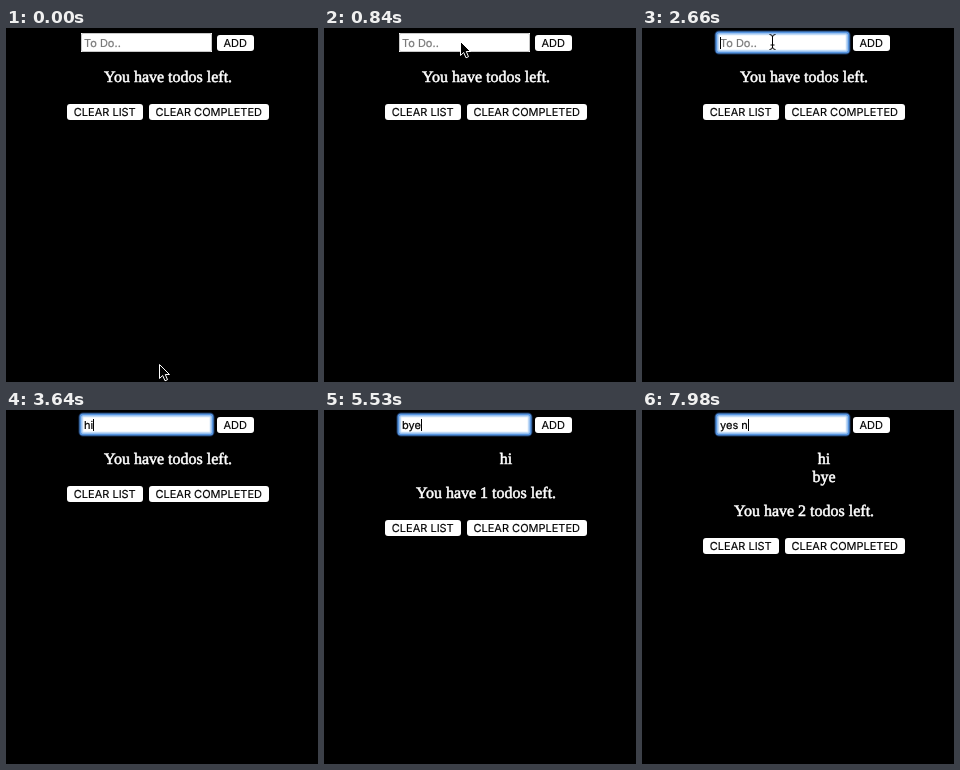
Recreate the animation shown at these times as an HTML page with a canvas. Size 312 by 354 pixels, loop 8000 ms.

```html
<!DOCTYPE html>
<html lang="en">
<head>
<meta charset="utf-8">
<title>To-do list</title>
<style>
html, body { margin: 0; width: 100%; height: 100%; overflow: hidden; background: #000; }
canvas { display: block; }
</style>
</head>
<body>
<canvas id="stage" width="312" height="354"></canvas>
<script>
const ctx = document.getElementById('stage').getContext('2d');
const LOOP = 8000;
const STEP = 70;
const UI = '11px Inter, sans-serif';
const SERIF = '16px "Liberation Serif", serif';
const FIELD = { x: 75, y: 5, w: 131, h: 19 };

const BEAM_AT = 2170;
const FOCUS_AT = 2660;
const keys = [
  ['h', 3500], ['i', 3640], ['\n', 4130],
  ['b', 5040], ['y', 5180], ['e', 5530], ['\n', 6090],
  ['y', 7140], ['e', 7280], ['s', 7560], [' ', 7630], ['n', 7980]
];

// Progress from 0 to 1 between two times
function ramp(t, from, to) {
  return Math.min(1, Math.max(0, (t - from) / (to - from)));
}

function text(str, x, y, font, color, align = 'center', weight = 0) {
  ctx.font = font;
  ctx.fillStyle = ctx.strokeStyle = color;
  ctx.textAlign = align;
  ctx.fillText(str, x, y);
  if (weight) {
    ctx.lineWidth = weight;
    ctx.strokeText(str, x, y);
  }
}

function serif(str, x, y) {
  text(str, x, y, SERIF, '#fff', 'center', 0.55);
}

function button(label, x, y, w) {
  ctx.beginPath();
  ctx.roundRect(x, y, w, 16, 3);
  ctx.fillStyle = '#fff';
  ctx.fill();
  text(label, x + w / 2 - 0.25, y + 12, UI, '#000', 'center', 0.15);
}

function ring(inset, width, color) {
  const { x, y, w, h } = FIELD;
  ctx.beginPath();
  ctx.roundRect(x + inset, y + inset, w - 2 * inset, h - 2 * inset, Math.max(0, 2 - inset));
  ctx.strokeStyle = color;
  ctx.lineWidth = width;
  ctx.stroke();
}

function field(t, typed, lastInput) {
  const focused = t >= FOCUS_AT;
  const left = FIELD.x + 3;
  ctx.fillStyle = '#fff';
  ctx.fillRect(FIELD.x, FIELD.y, FIELD.w, FIELD.h);
  if (focused) {
    ring(-1.5, 2, 'rgba(50, 105, 185, 0.5)');
    ring(-0.5, 2, '#5795e0');
    ring(1, 1.5, 'rgba(140, 187, 240, 0.75)');
    ring(2, 1, 'rgba(200, 224, 250, 0.5)');
  } else {
    ring(0.5, 1, '#c8c8c8');
  }
  text(typed || 'To Do..', left, 19, UI, typed ? '#000' : '#777', 'left', 0.2);
  const caretOn = typed || (t - lastInput) % 1000 < 490;
  if (focused && caretOn) {
    const x = left + Math.round(ctx.measureText(typed).width);
    ctx.fillStyle = '#000';
    ctx.fillRect(x, 9, 1, 12);
  }
}

function arrow() {
  ctx.beginPath();
  [[0, 0], [0, 14], [3.2, 11], [5.5, 16.3], [8, 15.2], [5.8, 10], [10, 10]]
    .forEach(([x, y]) => ctx.lineTo(x, y));
  ctx.closePath();
  ctx.fillStyle = '#000';
  ctx.fill();
  ctx.strokeStyle = '#fff';
  ctx.lineWidth = 1;
  ctx.stroke();
}

function beam() {
  ctx.beginPath();
  for (const s of [-1, 1]) {
    ctx.moveTo(-3, 7.5 * s);
    ctx.quadraticCurveTo(0, 7.5 * s, 0, 5 * s);
    ctx.quadraticCurveTo(0, 7.5 * s, 3, 7.5 * s);
  }
  ctx.moveTo(0, -6);
  ctx.lineTo(0, 6);
  ctx.moveTo(-2, 3);
  ctx.lineTo(2, 3);
  ctx.strokeStyle = '#000';
  ctx.lineWidth = 1;
  ctx.stroke();
}

function pointer(t) {
  if (t >= keys[0][1]) return;
  const rise = ramp(t, 0, 630);
  const nudge = ramp(t, BEAM_AT, 2380);
  const x = 153 - 17 * rise ** 1.5 - 6 * nudge;
  const y = 3 + 333 * (1 - rise) ** 1.85 + 10 * ramp(t, 700, 840) - 2 * nudge;
  const isBeam = t >= BEAM_AT;
  ctx.save();
  ctx.translate(Math.round(x) + 0.5, Math.round(y) + (isBeam ? 3 : 0.5));
  (isBeam ? beam : arrow)();
  ctx.restore();
}

function draw(t) {
  ctx.fillStyle = '#000';
  ctx.fillRect(0, 0, 312, 354);

  const pressed = keys.filter(([, time]) => time <= t);
  const todos = pressed.map(([key]) => key).join('').split('\n');
  const typed = todos.pop();
  const lastInput = pressed.length ? pressed.at(-1)[1] : FOCUS_AT;

  field(t, typed, lastInput);
  button('ADD', 211, 7, 37);

  todos.forEach((label, i) => serif(label, 182, 54 + 18 * i));
  const shift = todos.length ? 16 + 18 * todos.length : 0;
  const count = todos.length ? todos.length + ' ' : '';
  serif(`You have ${count}todos left.`, 162, 54 + shift);
  button('CLEAR LIST', 61, 76 + shift, 76);
  button('CLEAR COMPLETED', 143, 76 + shift, 120);

  pointer(t);
}

ctx.textRendering = 'geometricPrecision';
const start = performance.now();
function tick() {
  const t = (performance.now() - start) % LOOP;
  draw(Math.floor(t / STEP) * STEP);
  requestAnimationFrame(tick);
}
tick();
</script>
</body>
</html>
```
